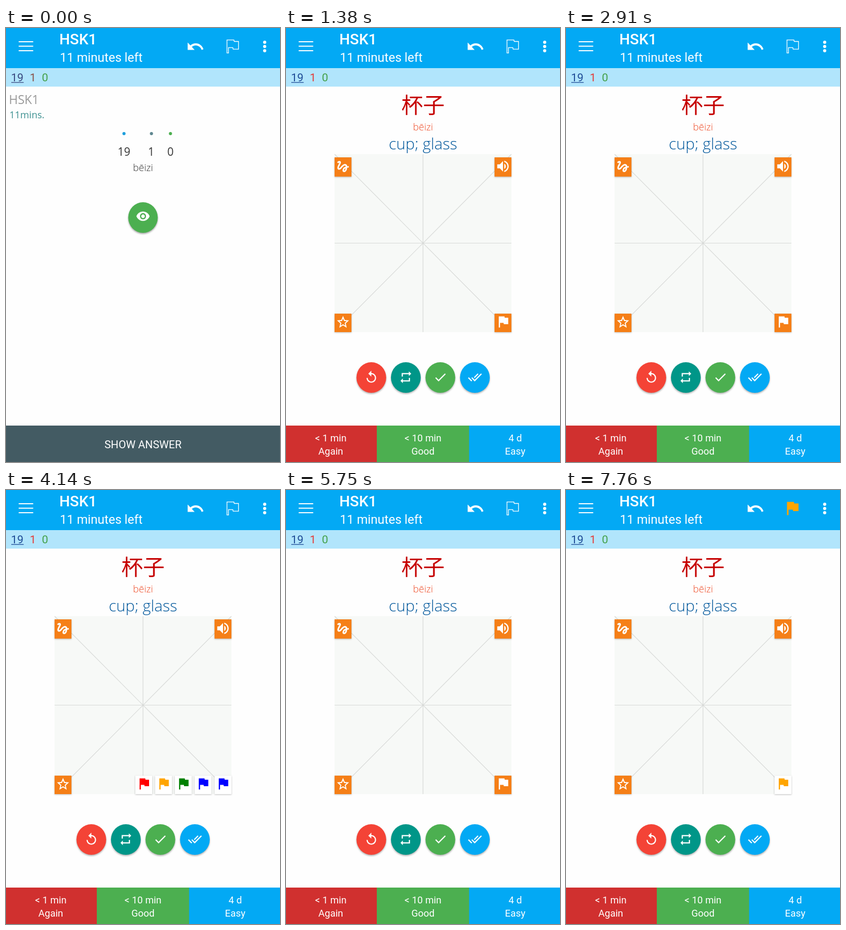
Recreate the animation shown at these times as an HTML page. Size 519 px wide and 822 px high, loop 8000 ms.

```html
<!DOCTYPE html>
<html lang="en">
<head>
<meta charset="utf-8">
<title>Flashcard review</title>
<style>
html, body { margin: 0; width: 100%; height: 100%; overflow: hidden; background: #fefefe; }
svg { display: block; width: 519px; height: 822px; }
text { font-family: Roboto, sans-serif; }
.open { font-family: "Open Sans", sans-serif; }
.light { font-weight: 300; }
.mid { text-anchor: middle; }
.han { font-family: "Noto Sans CJK SC", "Noto Sans CJK", "Noto Sans CJK JP", sans-serif; }
.shadow { filter: drop-shadow(0 2px 1.5px rgba(0, 0, 0, .3)); }
.soft { filter: drop-shadow(0 1.5px 1.5px rgba(0, 0, 0, .25)); }
.ease text { font-size: 18.4px; fill: #fff; text-anchor: middle; }

.front, .back, .ask, .ease, .palette, .eye, .tile, .mark, .bar, .new, .learn {
  animation: 8s step-end infinite;
}
.ask { animation-name: ask; }
.ease { animation-name: ease-row; }
.front { animation-name: front; }
.back { animation-name: back; }
.eye { animation-name: press; }
.palette { animation-name: palette; }
.tile { animation-name: tile; }
.mark { animation-name: mark; }
.bar { animation-name: bar; }
.new { animation-name: new; }
.learn { animation-name: learn; }

@keyframes ask { 0% { visibility: visible } 10.5%, 100% { visibility: hidden } }
@keyframes ease-row { 0% { visibility: hidden } 10.5%, 100% { visibility: visible } }
@keyframes front { 0% { visibility: visible } 14.375%, 100% { visibility: hidden } }
@keyframes back { 0% { visibility: hidden } 14.375%, 100% { visibility: visible } }
@keyframes press {
  0% { fill: #4caf50; filter: drop-shadow(0 2px 1.5px rgba(0, 0, 0, .35)) }
  10.5%, 100% { fill: #6dbf70; filter: none }
}
@keyframes palette {
  0%, 36.375%, 53.625%, 64.125%, 71.875%, 86.5%, 96%, 100% { visibility: hidden }
  28.75%, 44.125%, 59.375%, 66.25%, 78.625%, 90.25% { visibility: visible }
}
@keyframes tile {
  0%, 60.375% { fill: #f57f17 }
  49.75%, 82.625%, 100% { fill: #fff }
}
@keyframes mark {
  0%, 60.375% { fill: #fff }
  49.75% { fill: #00f }
  82.625% { fill: #008000 }
  94.125%, 100% { fill: #ffa500 }
}
@keyframes bar {
  0%, 60.375% { fill: transparent; stroke: #fff }
  52.75% { fill: #00f; stroke: transparent }
  82.625% { fill: #008000; stroke: transparent }
  94.125%, 100% { fill: #ffa500; stroke: transparent }
}
@keyframes new { 0% { fill: #38487f } 14.375%, 100% { fill: #1e4b96 } }
@keyframes learn { 0% { fill: #8a4f45 } 14.375%, 100% { fill: #e53935 } }
</style>
</head>
<body>
<svg viewBox="0 0 519 822">
  <defs>
    <path id="flag" d="M14.4 6L14 4H5v17h2v-7h5.6l.4 2h7V6z" transform="translate(-12.5 -12.5)"/>
  </defs>
  <rect width="519" height="822" fill="#fefefe"/>

  <!-- app bar -->
  <rect width="519" height="76" fill="#03a9f4"/>
  <path d="M24 26h27.5M24 34.5h27.5M24 43h27.5" stroke="#fff" stroke-width="2.2"/>
  <text x="101" y="30.5" font-size="28.3" font-weight="500" fill="#fff">HSK1</text>
  <text x="102" y="64" font-size="23.5" fill="#fff">11 minutes left</text>
  <path transform="translate(359 34.5) scale(1.46 1.55) translate(-12.2 -11.5)" fill="#fff"
    d="M12.5 8c-2.65 0-5.05.99-6.9 2.6L2 7v9h9l-3.62-3.62c1.39-1.16 3.16-1.88 5.12-1.88 3.54 0 6.55 2.31 7.6 5.5l2.37-.78C21.08 11.03 17.15 8 12.5 8z"/>
  <g class="bar" transform="translate(429.5 35) scale(1.46)" stroke-width=".9"><use href="#flag"/></g>
  <g fill="#fff">
    <circle cx="490" cy="27" r="3"/><circle cx="490" cy="35" r="3"/><circle cx="490" cy="43" r="3"/>
  </g>

  <!-- remaining counts -->
  <rect y="76" width="519" height="35" fill="#b1e5fc"/>
  <g font-size="21">
    <g class="new"><text x="9.5" y="101">19</text><rect x="10" y="102.5" width="23.5" height="1.3"/></g>
    <text class="learn" x="45" y="101">1</text>
    <text x="68" y="101" fill="#43a047">0</text>
  </g>

  <g class="front">
    <text class="open" x="5.5" y="144" font-size="23" fill="#999">HSK1</text>
    <text class="open" x="6.5" y="171" font-size="18" fill="#3c9090">11mins.</text>
    <g class="mid" font-size="21" fill="#333">
      <text class="open" x="223.5" y="242">19</text>
      <text class="open" x="275" y="242">1</text>
      <text class="open" x="311.5" y="242">0</text>
      <text class="open light" x="259.5" y="271" font-size="18.5">bēizi</text>
    </g>
    <circle cx="223.5" cy="200" r="3" fill="#1e9fdc"/>
    <circle cx="275.5" cy="200" r="3" fill="#5f8790"/>
    <circle cx="311.5" cy="200" r="3" fill="#4caf50"/>
    <ellipse class="eye" cx="259.5" cy="359" rx="28" ry="29"/>
    <path transform="translate(259.5 356.5) scale(1.14 1.18) translate(-12 -12)" fill="#fff"
      d="M12 4.5C7 4.5 2.73 7.61 1 12c1.73 4.39 6 7.5 11 7.5s9.27-3.11 11-7.5c-1.73-4.39-6-7.5-11-7.5zM12 17c-2.76 0-5-2.24-5-5s2.24-5 5-5 5 2.24 5 5-2.24 5-5 5zm0-8c-1.66 0-3 1.34-3 3s1.34 3 3 3 3-1.34 3-3-1.34-3-3-3z"/>
  </g>

  <g class="back">
    <text class="han mid" x="259.5" y="160.5" font-size="41" fill="#c60000">杯子</text>
    <text class="open light mid" x="259.5" y="194" font-size="18.5" fill="#ee4a25">bēizi</text>
    <text class="open light mid" x="259.5" y="230" font-size="29.7" fill="#01579b">cup; glass</text>

    <rect x="92" y="239" width="335" height="337" fill="#f7f9f7"/>
    <path d="M92 239L427 576M427 239L92 576M259.5 239V576M92 407.5H427" stroke="#d8dad8" stroke-width="1.2" fill="none"/>

    <g class="soft" fill="#f57f17">
      <rect x="92" y="245" width="32" height="36.5"/>
      <rect x="395" y="245" width="32" height="36.5"/>
      <rect x="92" y="541" width="32" height="35"/>
      <rect class="tile" x="395" y="541" width="32" height="35"/>
    </g>
    <path transform="translate(108 262) scale(1.22) translate(-12 -11.5)" fill="none" stroke="#fff" stroke-width="2.4"
      d="M3.7 6C5 4.5 7.8 3 7.5 6C7 8.5 4.3 11 4.4 13.8C4.6 16.2 7 16 8.5 14C10.5 11.5 12.5 9 14.8 9C17 9 17.5 10.5 17.3 13C17 17.5 15.5 19.4 13.8 19.2C11.8 19 12 16 14 14.3C15.8 12.8 18 12.2 21 12.2"/>
    <path transform="translate(411 262) scale(1.2 1.24) translate(-12 -12)" fill="#fff"
      d="M3 9v6h4l5 5V4L7 9H3zm13.5 3c0-1.77-1.02-3.29-2.5-4.03v8.05c1.48-.73 2.5-2.25 2.5-4.02zM14 3.23v2.06c2.89.86 5 3.54 5 6.71s-2.11 5.85-5 6.71v2.06c4.01-.91 7-4.49 7-8.77s-2.99-7.86-7-8.77z"/>
    <path transform="translate(108 556.5) scale(1.14 1.18) translate(-12 -11.5)" fill="#fff"
      d="M22 9.24l-7.19-.62L12 2 9.19 8.63 2 9.24l5.46 4.73L5.82 21 12 17.27 18.18 21l-1.63-7.03L22 9.24zM12 15.4l-3.76 2.27 1-4.28-3.32-2.88 4.38-.38L12 6.1l1.71 4.04 4.38.38-3.32 2.88 1 4.28L12 15.4z"/>
    <g class="mark" transform="translate(412 556.7) scale(1.2 1.24)"><use href="#flag"/></g>
  </g>

  <g class="palette" id="palette"></g>

  <g class="back" id="actions"></g>

  <!-- bottom bar -->
  <g class="ask">
    <rect y="753" width="519" height="69" fill="#435b63"/>
    <text class="mid" x="259.5" y="796" font-size="20.4" fill="#fff">SHOW ANSWER</text>
  </g>
  <g class="ease">
    <rect y="753" width="172" height="69" fill="#d0302f"/>
    <rect x="172" y="753" width="175" height="69" fill="#4caf50"/>
    <rect x="346.8" y="753" width="172.2" height="69" fill="#03a9f4"/>
    <text x="84.8" y="782.5">&lt; 1 min</text><text x="84.8" y="808">Again</text>
    <text x="259.5" y="782.5">&lt; 10 min</text><text x="259.5" y="808">Good</text>
    <text x="434.2" y="782.5">4 d</text><text x="434.2" y="808">Easy</text>
  </g>
</svg>
<script>
const fill = (id, items, draw) => {
  document.getElementById(id).innerHTML = items.map(draw).join("");
};

fill("palette", ["#f00", "#ffa500", "#008000", "#00f"], (color, i) => {
  const x = 245 + i * 37.4;
  return `<rect class="soft" x="${x}" y="541" width="32" height="35" fill="#fff"/>
    <g transform="translate(${x + 17} 556.7) scale(1.2 1.24)" fill="${color}"><use href="#flag"/></g>`;
});

const actions = [
  ["#f44336", "M12 5V1L7 6l5 5V7c3.31 0 6 2.69 6 6s-2.69 6-6 6-6-2.69-6-6H4c0 4.42 3.58 8 8 8s8-3.58 8-8-3.58-8-8-8z"],
  ["#009688", "M7 7h10v3l4-4-4-4v3H5v6h2V7zm10 10H7v-3l-4 4 4 4v-3h12v-6h-2v4z"],
  ["#4caf50", "M9 16.17L4.83 12l-1.42 1.41L9 19 21 7l-1.41-1.41z"],
  ["#03a9f4", "M18 7l-1.41-1.41-6.34 6.34 1.41 1.41L18 7zm4.24-1.41L11.66 16.17 7.48 12l-1.41 1.41L11.66 19l12-12-1.42-1.41zM.41 13.41L6 19l1.41-1.41L1.83 12 .41 13.41z"]
];
fill("actions", actions, ([color, icon], i) => {
  const x = 161.6 + i * 65.4;
  return `<ellipse class="shadow" cx="${x}" cy="662" rx="28.2" ry="29" fill="${color}"/>
    <path transform="translate(${x} 661.5) scale(1.13) translate(-12 -12)" fill="#fff" d="${icon}"/>`;
});
</script>
</body>
</html>
```
